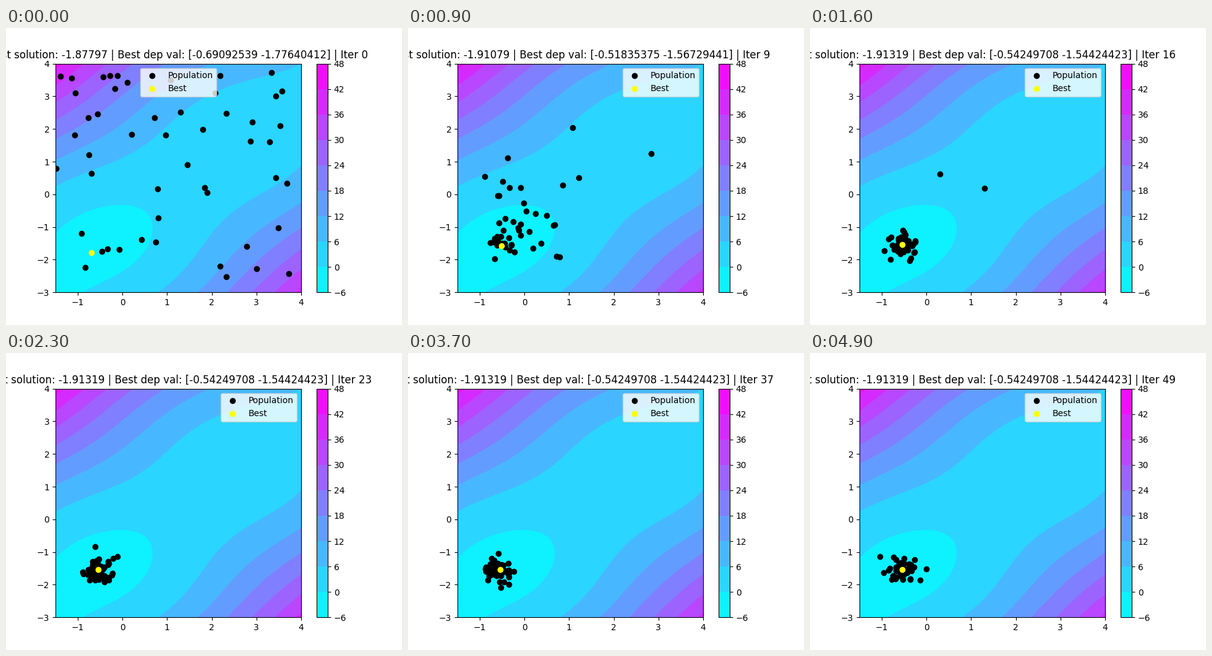
Animation, 640 px wide and 480 px high, one loop 5000 ms. Source, as a matplotlib script:

```python
import matplotlib.pyplot as plt
import numpy as np
from matplotlib.animation import FuncAnimation

FRAMES, INTERVAL, POPULATION = 50, 100, 50
LOW, HIGH = (-1.5, -3), (4, 4)
SPREAD = 0.19

# Iteration at which each best solution is found: value, x, y
BESTS = {
    0: (-1.87797, -0.69092539, -1.77640412),
    3: (-1.89712, -0.62174913, -1.66018274),
    9: (-1.91079, -0.51835375, -1.56729441),
    13: (-1.91319, -0.54249708, -1.54424423),
}

rng = np.random.default_rng(12)
starts = rng.uniform(LOW, HIGH, (POPULATION, 2))
settle = np.linspace(4, 11, POPULATION)
wander = rng.normal(0, SPREAD, (FRAMES, POPULATION, 2))

# Two stragglers join the others last
starts[-2:] = (1.3, 2.52), (3.3, 1.6)
settle[-2:] = 18


def surface(x, y):
    return np.sin(x + y) + (x - y) ** 2 - 1.5 * x + 2.5 * y + 1


def best_at(frame):
    return BESTS[max(k for k in BESTS if k <= frame)]


def population_at(frame):
    """Each member falls towards the best solution, then hovers around it."""
    far = np.exp(-(frame / settle) ** 3)[:, None]
    hover = np.array(best_at(frame)[1:]) + wander[frame]
    return far * starts + (1 - far) * hover


fig, ax = plt.subplots(figsize=(6.4, 4.8), dpi=100)
xs, ys = np.meshgrid(*(np.linspace(a, b, 100) for a, b in zip(LOW, HIGH)))
filled = ax.contourf(xs, ys, surface(xs, ys), levels=np.arange(-6, 49, 6),
                     cmap="cool")
fig.colorbar(filled)
members = ax.scatter([0], [0], color="black", label="Population")
leader = ax.scatter([0], [0], color="yellow", label="Best")
ax.set(xlim=(LOW[0], HIGH[0]), ylim=(LOW[1], HIGH[1]))
legend = ax.legend(loc="upper right")
title = ax.set_title("")


def update(frame):
    value, x, y = best_at(frame)
    members.set_offsets(population_at(frame))
    leader.set_offsets([(x, y)])
    # The legend moves to the corner once the population has left it
    legend.set_loc("upper center" if frame < 3 else "upper right")
    title.set_text(f"Best solution: {value:.5f} | "
                   f"Best dep val: [{x:.8f} {y:.8f}] | Iter {frame}")
    return members, leader, legend, title


animation = FuncAnimation(fig, update, frames=FRAMES, interval=INTERVAL,
                          repeat=True, repeat_delay=0)
plt.show()
```
